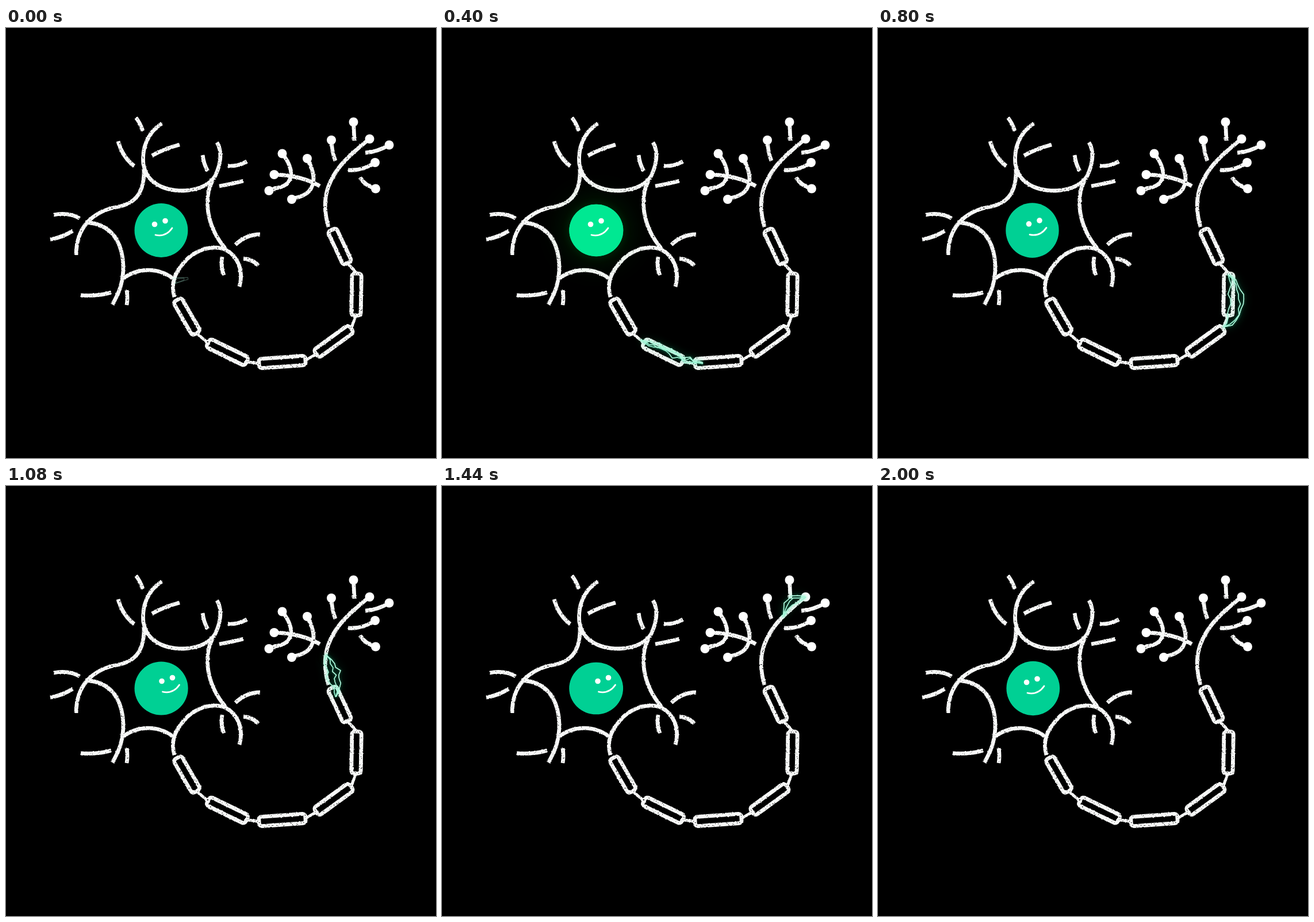
Recreate the animation shown at these times as an HTML page with a canvas. Size 748x748 px, loop 2.04 s.

```html
<!DOCTYPE html>
<html lang="en">
<head>
<meta charset="utf-8">
<title>Neuron</title>
<style>
  html, body { margin: 0; width: 100%; height: 100%; overflow: hidden; background: #000; }
  svg, canvas { position: absolute; left: 0; top: 0; width: 748px; height: 748px; display: block; }
  svg { will-change: transform; }
</style>
</head>
<body>
<svg viewBox="0 0 748 748" fill="none" stroke="#f8f9f8" stroke-width="6.8">
  <defs>
    <filter id="chalk" filterUnits="userSpaceOnUse" x="0" y="0" width="748" height="748" color-interpolation-filters="sRGB">
      <feTurbulence type="fractalNoise" baseFrequency="0.28" numOctaves="2" seed="4" result="grain"/>
      <feDisplacementMap in="SourceGraphic" in2="grain" scale="2.4" xChannelSelector="R" yChannelSelector="G" result="rough"/>
      <feTurbulence type="fractalNoise" baseFrequency="0.4" numOctaves="2" seed="9"/>
      <feColorMatrix values="0 0 0 0 1  0 0 0 0 1  0 0 0 0 1  7 0 0 0 -1.4" result="holes"/>
      <feComposite in="rough" in2="holes" operator="in"/>
    </filter>
  </defs>
  <g id="drawing" filter="url(#chalk)">
    <!-- cell body -->
    <path d="M271 166C246 182 236 210 239 237C244 268 272 283 308 283C335 282 356 272 364 257C373 238 377 216 367 199
      M240 246C241 285 226 305 195 311C165 316 122 335 122 395
      M138 338C183 340 203 372 204 415C204 444 196 462 185 481
      M202 437C226 418 262 414 291 436
      M360 264C343 295 348 345 382 384
      M293 468C284 437 300 418 316 401C341 379 372 377 389 390C406 404 413 426 406 450"/>
    <!-- loose dendrites -->
    <path d="M226 156Q234 166 238 179M195 197Q203 225 223 240M254 222Q275 210 302 203M342 221Q344 237 351 249
      M386 240Q404 241 419 232M371 275Q394 271 413 266M83 325Q108 320 128 331M77 368Q98 364 116 353
      M399 377Q418 359 442 359M413 401Q430 403 439 413M376 398Q373 415 379 430M130 465Q160 467 183 460
      M210 456Q212 470 210 482"/>
  </g>
</svg>
<canvas width="748" height="748"></canvas>
<script>
const LOOP = 2040, STEP = 40, TAU = Math.PI * 2;
const ctx = document.querySelector("canvas").getContext("2d");
const drawing = document.getElementById("drawing");

function shape(tag, attrs, parent) {
  const el = document.createElementNS("http://www.w3.org/2000/svg", tag);
  for (const key in attrs) el.setAttribute(key, attrs[key]);
  if (parent) parent.append(el);
  return el;
}

// Each terminal starts at its round tip
const fibre = "C549 305 555 272 583 238C598 220 614 208 632 193";
const terminals = [
  "M632.5 193L630 195", "M604.5 163.5L606 196", "M566 195Q567 216 573 231", "M666.5 203.5Q645 216 625 217",
  "M642 234Q620 249 595 247", "M643 279.5Q624 274 616 260", "M480.5 218.5C504 248 501 276 466 279",
  "M466.5 255Q513 256 546 275", "M524 227C542 260 540 290 500 296", "M457.5 283L468 279", "M497 298L503 296"
];
const tips = terminals.map(d => shape("path", { d }, drawing).getPointAtLength(0));

// Sheaths in travel order: centre, length, heading
const sheaths = [
  [314.5, 502, 67, 60], [385, 564, 75, 26], [480.5, 581, 81, -4],
  [570, 545, 75, -36], [609.5, 463.5, 73, -89], [580.5, 380, 64, -115]
];
let route = "M291 435", links = "";
for (const [x, y, len, deg] of sheaths) {
  const a = deg / 360 * TAU, dx = Math.cos(a) * len / 2, dy = Math.sin(a) * len / 2;
  links += links ? `L${x - dx} ${y - dy}` : " ";
  links += `M${x + dx} ${y + dy}`;
  route += `L${x - dx} ${y - dy}L${x + dx} ${y + dy}`;
  shape("rect", {
    x: -len / 2, y: -8.2, width: len, height: 16.4, rx: 5,
    transform: `translate(${x} ${y}) rotate(${deg})`
  }, drawing);
}
shape("path", { d: links, "stroke-width": 5 }, drawing);
shape("path", { d: "M561 346" + fibre }, drawing);
const axon = shape("path", { d: route + "L561 346" + fibre });
const axonLen = axon.getTotalLength();

// Smooth 0..1 between two times
function ramp(t, from, to) {
  const u = Math.min(1, Math.max(0, (t - from) / (to - from)));
  return u * u * (3 - 2 * u);
}

// Cosine that peaks at a given time
const wave = (t, peak, period) => Math.cos(TAU * (t - peak) / period);

function random(seed) {
  let s = seed * 7919 + 17;
  return () => {
    s = (s * 16807) % 2147483647;
    return s / 2147483647;
  };
}

function disc(x, y, rx, ry = rx) {
  ctx.beginPath();
  ctx.ellipse(x, y, rx, ry, 0, 0, TAU);
  ctx.fill();
}

function shadow(color, blur) {
  ctx.shadowColor = color;
  ctx.shadowBlur = blur;
}

function drawNucleus(t) {
  const x = 268.8 + 1.3 * wave(t, 80, LOOP / 2);
  const squash = wave(t, 320, LOOP / 2);
  const rx = 46.6 + 0.4 * squash, ry = 46.4 - 1.3 * squash;
  const glow = ramp(t, 0, 200) * (1 - ramp(t, 280, 520));
  ctx.save();
  ctx.fillStyle = `rgb(0,${208 + 47 * glow},${148 - 4 * glow})`;
  if (glow > 0) {
    shadow(`rgba(0,190,30,${0.5 * glow})`, 60);
    disc(x, 352, rx, ry);
    shadow(`rgba(0,230,70,${0.25 * glow})`, 16);
  }
  disc(x, 352, rx, ry);
  ctx.restore();
}

function drawFace(t) {
  const look = ramp(t, 680, 1000) - ramp(t, 1480, 1800);
  ctx.save();
  ctx.translate(12.5 * look, -2 * look);
  ctx.fillStyle = ctx.strokeStyle = "#fff";
  disc(258.5, 341.5, 4.8);
  disc(277, 335.5, 4.8);
  ctx.lineWidth = 2.8;
  ctx.lineCap = "round";
  ctx.beginPath();
  ctx.moveTo(260, 360);
  ctx.quadraticCurveTo(278, 364, 289, 348);
  ctx.stroke();
  ctx.restore();
}

function drawTips(t) {
  const glow = ramp(t, 1480, 1640) * (1 - ramp(t, 1680, 1980));
  ctx.save();
  ctx.fillStyle = "#fff";
  for (const { x, y } of tips) {
    if (glow > 0) {
      shadow(`rgba(255,255,255,${0.75 * glow})`, 24);
      disc(x, y, 8);
      shadow(`rgba(255,255,255,${0.4 * glow})`, 12);
    }
    disc(x, y, 8);
  }
  ctx.restore();
}

// Point on the axon pushed sideways
function beside(share, off) {
  const d = share * axonLen;
  const p = axon.getPointAtLength(d);
  const a = axon.getPointAtLength(Math.max(0, d - 12));
  const b = axon.getPointAtLength(Math.min(axonLen, d + 12));
  const dx = b.x - a.x, dy = b.y - a.y, n = Math.hypot(dx, dy) || 1;
  return [p.x + dy / n * off, p.y - dx / n * off];
}

function drawSpark(t) {
  const u = Math.min(1, Math.max(0, (t - 160) / 1380));
  const mid = 1 - (1 - u) ** 1.4;
  const half = (0.085 - 0.045 * mid) * Math.min(1, (t + 30) / 200) * (1 - ramp(t, 1460, 1540));
  if (half <= 0) return;
  const tail = Math.max(0, mid - half), head = Math.min(1, mid + half);
  const bow = -30 * wave(t, 900, 1640);
  const count = Math.max(3, Math.round((head - tail) * axonLen / 8));
  const strength = ramp(t, -40, 120);
  const rnd = random(t / STEP + 3);

  ctx.save();
  ctx.lineJoin = ctx.lineCap = "round";
  ctx.lineWidth = 1.5;
  ctx.strokeStyle = `rgba(180,250,222,${0.85 * strength})`;
  for (const lane of [0.1, 0.7, 1]) {
    ctx.beginPath();
    for (let i = 0; i <= count; i++) {
      const k = i / count;
      const arch = Math.sin(Math.PI * k) ** 0.7;
      const off = arch * bow * lane + (rnd() - 0.5) * 8 * (0.3 + 0.7 * arch);
      ctx.lineTo(...beside(tail + (head - tail) * k, off));
    }
    shadow(`rgba(40,200,140,${0.7 * strength})`, 16);
    ctx.stroke();
    shadow(`rgba(50,235,170,${0.6 * strength})`, 5);
    ctx.stroke();
  }
  ctx.restore();
}

const start = performance.now();
function frame() {
  const elapsed = (performance.now() - start) % LOOP;
  const t = Math.floor(elapsed / STEP) * STEP;
  ctx.clearRect(0, 0, 748, 748);
  drawNucleus(t);
  drawFace(t);
  drawTips(t);
  drawSpark(t);
  requestAnimationFrame(frame);
}
frame();
</script>
</body>
</html>
```
